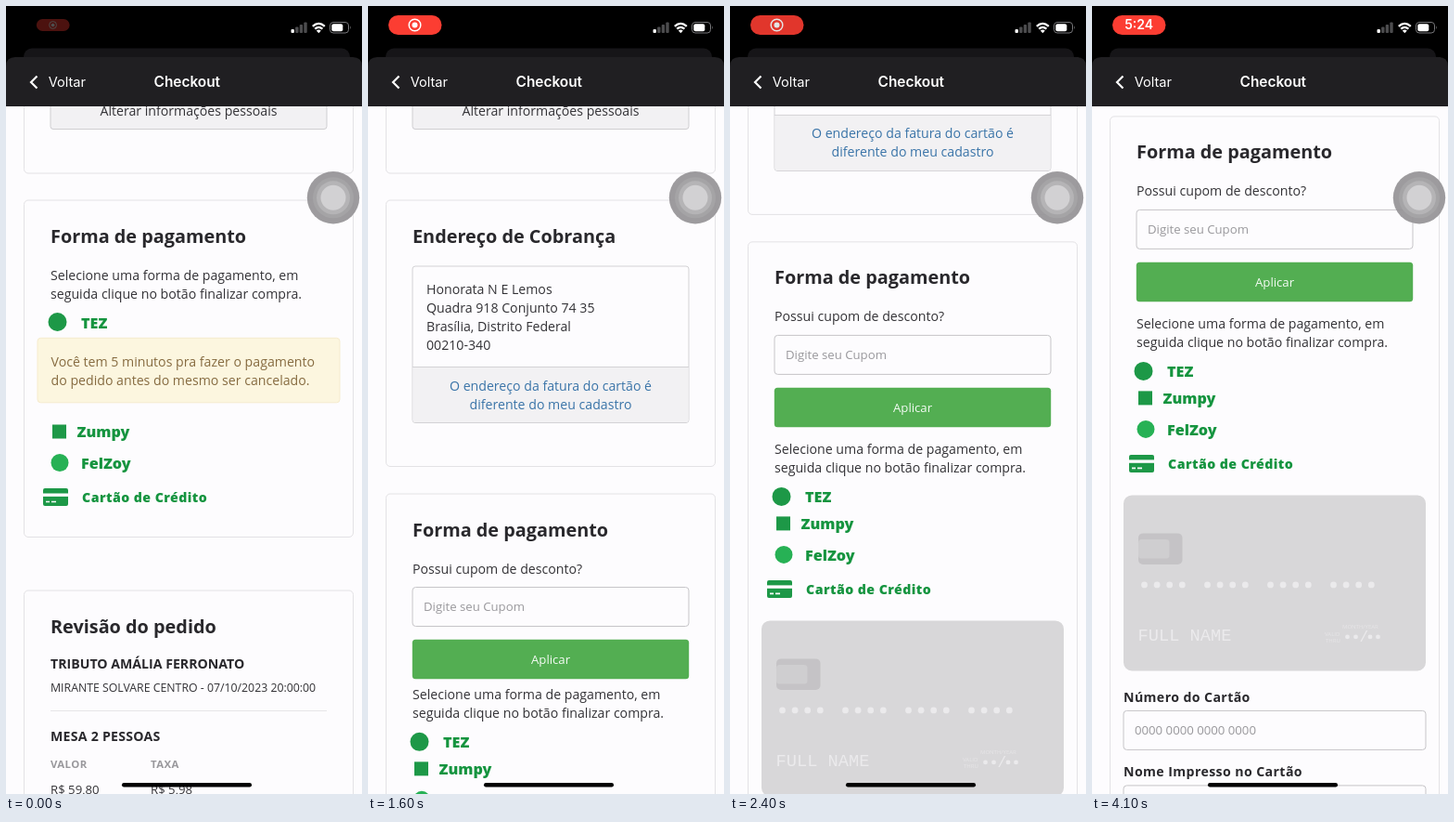
An HTML page that plays this animation: 384x848 px, repeating every 4.2 s.

```html
<!DOCTYPE html>
<html lang="pt-BR">
<head>
<meta charset="utf-8">
<title>Checkout</title>
<style>
html, body { margin: 0; width: 100%; height: 100%; overflow: hidden; background: #fdfcfe; }
svg { display: block; width: 384px; height: 848px; }
text { font-family: "Open Sans", sans-serif; font-size: 14.15px; fill: #333236; white-space: pre; }
.title { font-size: 19.85px; font-weight: 700; fill: #29282c; }
.small { font-size: 13.2px; }
.hint { font-size: 13.2px; fill: #99989c; }
.venue { font-size: 12.3px; }
.bold { font-weight: 700; fill: #29282c; }
.label { font-weight: 700; letter-spacing: .4px; fill: #29282c; }
.col { font-size: 11.4px; font-weight: 700; letter-spacing: .4px; fill: #99989c; }
.pay { font-size: 16.2px; font-weight: 800; fill: #15943f; }
.credit { font-size: 14.15px; letter-spacing: .45px; }
.link { fill: #3a74a8; }
.warn { fill: #866b40; }
.white { fill: #f4fbf4; }
.ui { font-family: Inter, sans-serif; fill: #fff; }
.mono { font-family: "Liberation Mono", monospace; font-size: 18.7px; fill: #ebeaec; }
.tiny { font-size: 6px; fill: #e6e5e7; }
.mid { text-anchor: middle; }
</style>
</head>
<body>
<svg id="stage" viewBox="0 0 384 848" xmlns="http://www.w3.org/2000/svg"></svg>
<script>
const LOOP = 4200;
const TAP = 1070;
const ADDRESS_H = 316, COUPON_H = 143, ALERT_H = 89;
const GREEN = '#1d9847', PALE = '#ebeaec';

const text = (x, y, str, cls = '', extra = '') =>
  `<text x="${x}" y="${y}" class="${cls}" ${extra}>${str}</text>`;
const rect = (x, y, w, h, r, fill, stroke = 'none', extra = '') =>
  `<rect x="${x}" y="${y}" width="${w}" height="${h}" rx="${r}" fill="${fill}" stroke="${stroke}" ${extra}/>`;
const circle = (x, y, r, fill, extra = '') =>
  `<circle cx="${x}" cy="${y}" r="${r}" fill="${fill}" ${extra}/>`;
const lines = (x, y, list, cls) =>
  list.map((s, i) => text(x, y + i * 20, s, cls)).join('');
const group = (id, body, extra = '') => `<g id="${id}" ${extra}>${body}</g>`;
const clip = (id, x, y, w) =>
  `<clipPath id="${id}"><rect x="${x}" y="${y}" width="${w}" height="0"/></clipPath>`;
const panel = (y, h, extra = '') => rect(19.5, y, 355, h, 4.5, '#fdfcfe', '#e3e2e5', extra);
const field = (x, y, w) => rect(x, y, w, 42, 3.5, '#fdfcfe', '#c6c5c8');

const topPanel = () =>
  panel(60.5, 119.5) +
  rect(48, 80, 298, 52.5, 3, '#f2f1f3', '#cfced1') +
  text(197, 118, 'Alterar informações pessoais', 'mid');

const address = () =>
  panel(209, 286.5) +
  text(48, 254.5, 'Endereço de Cobrança', 'title') +
  rect(48, 280, 298, 168.5, 3, '#fdfcfe', '#d3d2d5') +
  '<path d="M48.5 389H345.5V446q0 2-2 2H50.5q-2 0-2-2Z" fill="#f2f1f3"/>' +
  '<path d="M48 388.5H346" stroke="#d3d2d5"/>' +
  lines(63, 309.5, ['Honorata N E Lemos', 'Quadra 918 Conjunto 74 35',
    'Brasília, Distrito Federal', '00210-340']) +
  lines(197, 413.5, ['O endereço da fatura do cartão é', 'diferente do meu cadastro'], 'link mid');

const coupon = () =>
  text(48, 294.5, 'Possui cupom de desconto?') +
  field(48, 309.5, 298) +
  text(60, 335, 'Digite seu Cupom', 'hint') +
  rect(47.8, 365.8, 298.4, 42.5, 3.5, '#53ae52') +
  text(197, 392, 'Aplicar', 'small white mid');

const intro = () =>
  lines(48, 294.5, ['Selecione uma forma de pagamento, em',
    'seguida clique no botão finalizar compra.']) +
  circle(55.5, 340, 10, GREEN) +
  text(81, 346.5, 'TEZ', 'pay');

const alertBox = () =>
  rect(34, 357.3, 326, 69.5, 3.5, '#fcf6df', '#f6ebcd') +
  lines(48.5, 387.5, ['Você tem 5 minutos pra fazer o pagamento',
    'do pedido antes do mesmo ser cancelado.'], 'warn');

const methods = () =>
  rect(50, 450.5, 15, 15, 0, GREEN) +
  text(76.5, 464, 'Zumpy', 'pay') +
  circle(58, 491.5, 9.5, '#27b155') +
  text(81, 498, 'FelZoy', 'pay') +
  rect(40, 519, 27, 19, 2, GREEN) +
  '<path d="M40 526.2H67" stroke="#fdfcfe" stroke-width="3.4"/>' +
  '<path d="M43 533.5H47M49 533.5H54" stroke="#fdfcfe" stroke-width="1.6"/>' +
  text(82, 534, 'Cartão de Crédito', 'pay credit');

function cardForm() {
  let dots = '';
  for (let i = 0; i < 19; i++)
    if (i % 5 < 4) dots += circle(56.5 + i * 13.6, 659, 3.4, PALE);
  for (const x of [275.5, 284.5, 300, 308.5]) dots += circle(x, 715, 2.4, PALE);
  return rect(34, 562.5, 326, 189, 9, '#d8d7d9') +
    rect(50, 603.5, 47.5, 33.5, 5, '#c5c3c6') +
    rect(50, 610, 33.5, 20.5, 3.5, '#cfced0') + dots +
    text(49.5, 719.5, 'FULL NAME', 'mono') +
    text(270, 706, 'MONTH/YEAR', 'tiny') +
    text(251, 714, 'VALID', 'tiny') + text(252, 721, 'THRU', 'tiny') +
    text(288.5, 720, '/', 'mono', 'style="font-size:16px"') +
    text(34, 785.5, 'Número do Cartão', 'label') +
    field(34, 794.5, 326) +
    text(46, 820.5, '0000 0000 0000 0000', 'hint') +
    text(34, 865.5, 'Nome Impresso no Cartão', 'label') +
    field(34, 875, 326);
}

const review = () =>
  panel(629, 300) +
  text(48, 675, 'Revisão do pedido', 'title') +
  text(48, 713, 'TRIBUTO AMÁLIA FERRONATO', 'bold') +
  text(48, 737.5, 'MIRANTE SOLVARE CENTRO - 07/10/2023 20:00:00', 'venue') +
  '<path d="M48 758.5H346" stroke="#e6e5e8"/>' +
  text(48, 791, 'MESA 2 PESSOAS', 'bold', 'letter-spacing=".25"') +
  text(48, 820, 'VALOR', 'col') + text(156, 820, 'TAXA', 'col') +
  text(48, 847.5, 'R$ 59,80', 'small') + text(156, 847.5, 'R$ 5,98', 'small');

function statusBar() {
  let bars = '';
  for (let i = 0; i < 4; i++)
    bars += rect(307.5 + i * 4.6, 25 - i * 2.5, 3.4, 4 + i * 2.5, 1, i ? '#4c4c4e' : '#fff');
  return bars +
    '<g fill="none" stroke="#fff" stroke-width="2.3">' +
    '<path d="M330.8 21.8Q337.3 15.9 343.8 21.8"/><path d="M333.2 24.7Q337.3 21 341.4 24.7"/></g>' +
    '<path d="M334.8 26.6Q337.3 24.6 339.8 26.6L337.3 29.3Z" fill="#fff"/>' +
    rect(349.5, 17.5, 20, 11.5, 3.5, 'none', '#77777a') +
    rect(351.3, 19.3, 12, 8, 2, '#fff') +
    '<path d="M371 21.3q1.8 2 0 4Z" fill="#77777a"/>';
}

const pill = () =>
  rect(22, 10, 57.5, 21, 10.5, '#fc3d32') +
  group('rec', circle(50.5, 20.5, 6.3, 'none', 'stroke="#fff" stroke-width="1.5"') +
    circle(50.5, 20.5, 3, '#fff')) +
  group('clock', text(50.7, 25.4, '5:24', 'ui mid', 'style="font-size:14px;font-weight:600"'));

const header = () =>
  rect(0, 0, 384, 70, 0, '#000') +
  rect(19, 45.5, 352, 30, 9, '#161518') +
  '<path d="M0 108V65Q0 55 10 55H374Q384 55 384 65V108Z" fill="#201f22"/>' +
  '<path d="M33.5 75.5L27 82L33.5 88.5" fill="none" stroke="#fff" stroke-width="2.2"/>' +
  text(45.7, 87, 'Voltar', 'ui', 'style="font-size:14.6px"') +
  text(195.3, 87.3, 'Checkout', 'ui mid', 'style="font-size:15.4px;font-weight:600"') +
  statusBar() + group('pill', pill());

const touch = () =>
  circle(353, 206.3, 28.2, '#969497', 'opacity=".93"') +
  circle(353, 206.3, 22, '#a5a4a6') +
  circle(353, 206.3, 18, '#b5b4b6') +
  circle(353, 206.3, 13.5, '#d2d1d3');

document.getElementById('stage').innerHTML =
  `<defs>${clip('couponClip', 30, 279, 340)}${clip('alertClip', 48, 357, 320)}</defs>` +
  rect(0, 0, 384, 848, 0, '#fdfcfe') +
  group('scroller',
    topPanel() +
    group('address', address()) +
    group('payment',
      panel(209, 362.5, 'id="payPanel"') +
      text(48, 254.5, 'Forma de pagamento', 'title') +
      group('coupon', coupon(), 'clip-path="url(#couponClip)"') +
      group('upper', intro() + group('alert', alertBox())) +
      group('lower', methods() + group('cardForm', cardForm()))) +
    group('review', review())) +
  header() + touch() + rect(125, 836, 140, 4.5, 2.2, '#000');

const $ = id => document.getElementById(id);
const clamp = v => Math.min(1, Math.max(0, v));
const swing = v => 0.5 - Math.cos(Math.PI * clamp(v)) / 2;
const shift = (id, y) => $(id).setAttribute('transform', `translate(0 ${y.toFixed(2)})`);
const show = (id, on) => $(id).setAttribute('display', on ? 'inline' : 'none');

// time, scroll offset, speed in px per ms
const KEYS = [[1850, 0, 0], [2200, 148, .61], [2400, 270.5, .6], [2700, 406.6, 0], [2850, 406.1, 0]];

function scrollAt(t) {
  if (t <= KEYS[0][0]) return 0;
  for (let i = 1; i < KEYS.length; i++) {
    const [t0, y0, v0] = KEYS[i - 1], [t1, y1, v1] = KEYS[i];
    if (t > t1) continue;
    const d = t1 - t0, u = (t - t0) / d, w = 1 - u;
    return w * w * ((1 + 2 * u) * y0 + u * d * v0) + u * u * ((3 - 2 * u) * y1 - w * d * v1);
  }
  return KEYS[KEYS.length - 1][1];
}

function drawPill(t) {
  const flip = 3600;
  const dip = Math.max(0, 1 - t / 200, 1 - Math.abs(t - flip) / 150);
  const pulse = 0.17 * swing((t - 2000) / 700) * (1 - swing((t - 2800) / 700));
  const k = 1 - 0.38 * dip;
  $('pill').setAttribute('transform', `translate(50.7 20.5) scale(${k}) translate(-50.7 -20.5)`);
  $('pill').setAttribute('opacity', (1 - pulse) * (1 - 0.7 * dip));
  show('rec', t < flip);
  show('clock', t >= flip);
}

function draw(t) {
  const open = t >= TAP;
  const couponH = COUPON_H * swing((t - TAP) / 620);
  const gone = ALERT_H * swing((t - TAP) / 410);
  shift('scroller', -scrollAt(t));
  shift('payment', open ? ADDRESS_H : 0);
  shift('upper', couponH);
  shift('lower', couponH - gone);
  for (const id of ['address', 'coupon', 'cardForm']) show(id, open);
  show('review', !open);
  show('alert', gone < ALERT_H);
  $('payPanel').setAttribute('height', open ? 1200 : 362.5);
  $('couponClip').firstChild.setAttribute('height', couponH);
  $('alertClip').firstChild.setAttribute('height', ALERT_H - gone);
  if (open) $('alert').setAttribute('clip-path', 'url(#alertClip)');
  else $('alert').removeAttribute('clip-path');
  drawPill(t);
}

const start = performance.now();
function tick() {
  draw((performance.now() - start) % LOOP);
  requestAnimationFrame(tick);
}
tick();
</script>
</body>
</html>
```
